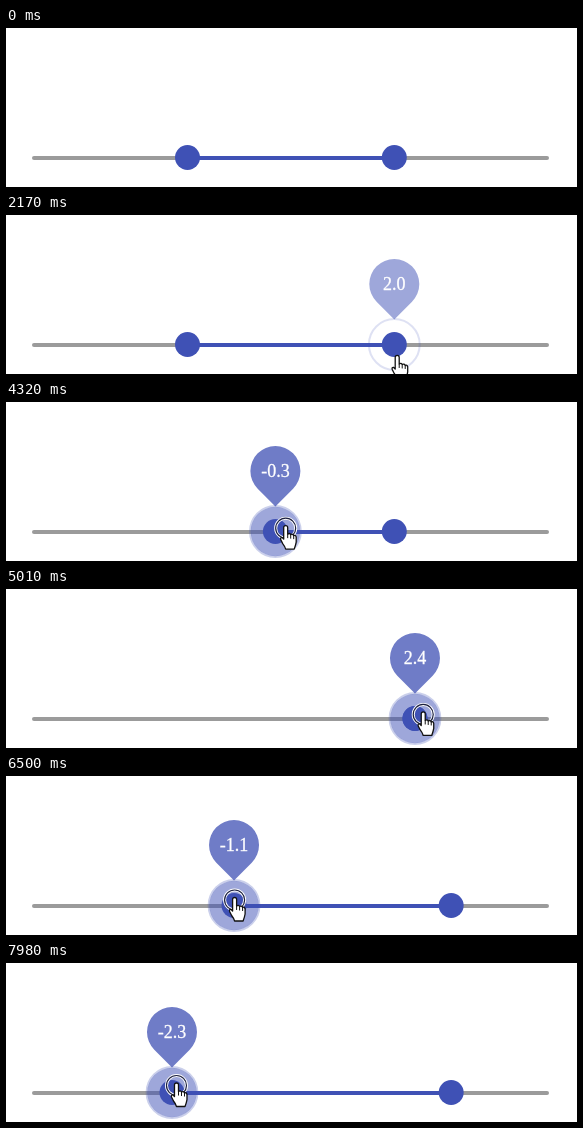
Write an HTML page that moves like this. It is 571 px wide and 159 px high and loops after 8 s.

```html
<!DOCTYPE html>
<html lang="en">
<head>
<meta charset="utf-8">
<title>Range slider</title>
<style>
html, body { margin: 0; width: 100%; height: 100%; overflow: hidden; background: #fff; }
svg { display: block; }
text {
  font: 18px "Liberation Serif", "Times New Roman", serif;
  fill: #fff; stroke: #fff; stroke-width: .3; text-anchor: middle;
}
</style>
</head>
<body>
<svg width="571" height="159" viewBox="0 0 571 159">
  <g fill="none" stroke-width="4" stroke-linecap="round">
    <path d="M28 130H541" stroke="#9b9b9b"/>
    <path id="bar" stroke="#3f51b5"/>
  </g>
  <g id="halo">
    <circle id="fill" r="24.7" fill="#3f51b5"/>
    <circle id="ring" r="25.4" fill="none" stroke="#3f51b5" stroke-width="2"/>
  </g>
  <g fill="#3f51b5">
    <circle id="right" r="12.5" cy="129.5"/>
    <circle id="left" r="12.5" cy="129.5"/>
  </g>
  <g id="bubble">
    <path id="drop" d="M0 -25L-17.7 -42.8A25 25 0 1 1 17.7 -42.8Z" fill="#3f51b5"/>
    <text id="label" y="-54.5"></text>
  </g>
  <g id="cursor" fill="none">
    <g id="press">
      <circle cy="2" r="10" stroke="#fff" stroke-width="3"/>
      <circle cy="2" r="10" stroke="#1c2040" stroke-width="1.2"/>
    </g>
    <path d="M-2 1.5Q-2 -.5 0 -.5T2 1.5V8Q4 6.5 5 8.5Q7 7.3 8 9.5Q10 8.5 10.5 11V16Q10 19 8.5 23H0Q-1 20 -3 17.5L-5 13.5Q-5.5 11 -3.5 11.5L-2 13Z"
      fill="#fff" stroke="#111" stroke-width="1.3" stroke-linejoin="round"/>
    <path d="M2 8V12M5 8.5V12.5M8 9.5V13" stroke="#111"/>
  </g>
</svg>
<script>
const LOOP = 8000, GRAB = 3450, PRESS = 3500;
const $ = id => document.getElementById(id);
const set = (id, attrs) => {
  for (const k in attrs) $(id).setAttribute(k, attrs[k]);
};

// Turning points of the drag: time, value
const drag = [[GRAB, -2], [4260, -.5], [5090, 2.7], [5280, 2.7], [5480, 3.1],
  [5720, 3.1], [7050, -4], [7980, -2.3]];

// Pointer before the drag: time, x, y
const path = [[1000, 392, 161], [1800, 389, 133], [2640, 394, 151],
  [3200, 190, 140], [GRAB, 186, 125], [LOOP, 186, 120.5]];

const clamp = u => Math.min(1, Math.max(0, u));
const ease = u => 1 - (1 - clamp(u)) ** 3;
const toX = v => 284.9 + 51.7 * v;

// Linear interpolation between keys, held at both ends
function at(keys, t, col = 1) {
  const i = keys.findIndex(k => k[0] > t);
  if (i < 0) return keys[keys.length - 1][col];
  if (i === 0) return keys[0][col];
  const a = keys[i - 1], b = keys[i];
  return a[col] + (b[col] - a[col]) * (t - a[0]) / (b[0] - a[0]);
}

function draw(t) {
  const low = Math.round(at(drag, t) * 10) / 10 + 0;
  const high = t > 5480 ? 3.1 : Math.max(2, low); // the lower thumb pushes the upper one
  const onRight = t < 3000;
  const value = onRight ? high : low;
  const show = onRight ? ease((t - 1450) / 400) - ease((t - 2200) / 400) : ease((t - 3195) / 400);
  const pressed = clamp((t - PRESS) / 320);
  const place = `translate(${toX(value)} 129.5) scale(${show})`;
  // The thumb trails the pointer slightly
  const handX = t < GRAB ? at(path, t) : toX(at(drag, t + 20)) + 4.5;

  set("bar", { d: `M${toX(low)} 130H${toX(high)}` });
  set("left", { cx: toX(low) });
  set("right", { cx: toX(high) });
  set("halo", { transform: place, opacity: show });
  set("fill", { opacity: .5 * pressed });
  set("ring", { opacity: .17 + .1 * pressed });
  set("bubble", { transform: place });
  set("drop", { opacity: show * (.5 + .25 * pressed) });
  $("label").textContent = value.toFixed(1);
  set("cursor", { transform: `translate(${handX} ${at(path, t, 2)})` });
  set("press", { opacity: t >= PRESS ? 1 : 0 });
}

function tick() {
  draw(performance.now() % LOOP);
  requestAnimationFrame(tick);
}
tick();
</script>
</body>
</html>
```
